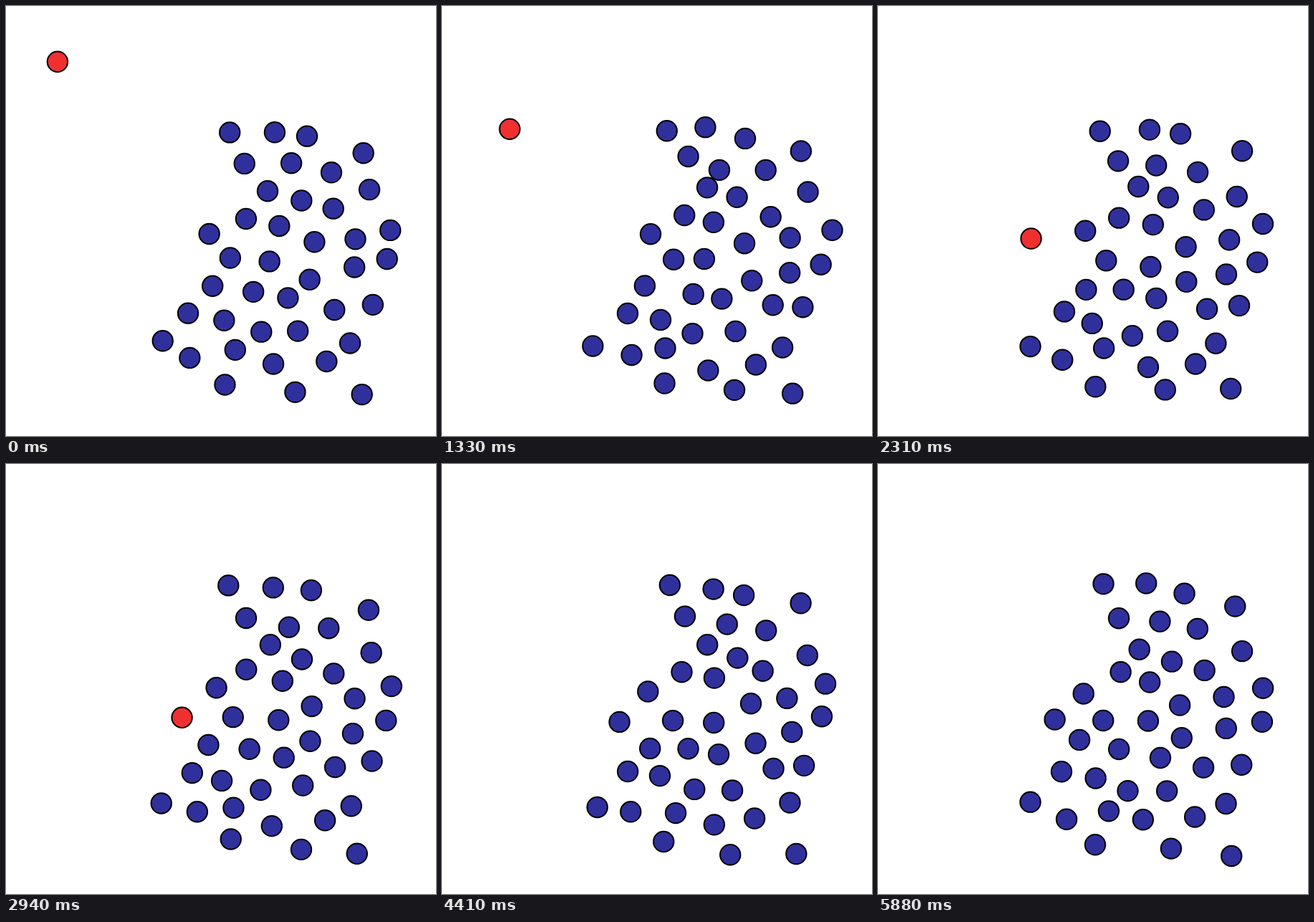
An HTML page with a canvas for the animation above (5950 ms loop, 600 by 600 pixels).

```html
<!DOCTYPE html>
<html lang="en">
<head>
<meta charset="utf-8">
<title>Particles</title>
<style>
  html, body { margin: 0; width: 100%; height: 100%; overflow: hidden; background: #fff; }
  canvas { display: block; width: 600px; height: 600px; }
</style>
</head>
<body>
<canvas id="stage" width="600" height="600"></canvas>
<script>
const ctx = document.getElementById('stage').getContext('2d');
const STEP = 70, LOOP = 5950;
const BLUE = '#30309c', RED = '#f03030';
const JOIN_TIME = 3360; // the newcomer takes the colour of the group

// Rest positions of the group: x, y pairs.
const rest = [
  314,170, 374,172, 421,182, 500,199, 340,215, 393,224, 450,232, 364,255,
  411,272, 508,263, 455,288, 539,308, 334,291, 383,303, 287,318, 428,335,
  486,325, 534,358, 317,354, 374,358, 286,391, 343,401, 389,410, 431,384,
  486,372, 506,417, 459,423, 258,430, 302,438, 215,473, 262,490, 320,481,
  355,456, 409,454, 479,473, 377,503, 440,498, 309,530, 406,542, 492,541
];

// Route of the newcomer: time, x, y.
const route = [
  [0, 67, 78], [840, 67, 78], [1260, 81, 154], [1330, 88, 173],
  [1890, 169, 272], [2310, 216, 324], [2940, 246, 352], [3220, 246, 360]
];

// Repeatable random value in 0..1 for an integer key.
function rand(key) {
  let n = Math.imul(key + 1, 0x9e3779b1);
  n = Math.imul(n ^ n >>> 16, 0x85ebca6b);
  n = Math.imul(n ^ n >>> 13, 0xc2b2ae35);
  return ((n ^ n >>> 16) >>> 0) / 4294967296;
}

function shake(ball, step, axis) {
  const key = ((step * 64 + ball) * 2 + axis) * 2;
  return rand(key) + rand(key + 1) - 1;
}

function along(t) {
  const i = route.findIndex(p => p[0] > t);
  if (i < 0) return route[route.length - 1].slice(1);
  const [t0, x0, y0] = route[i - 1], [t1, x1, y1] = route[i];
  const k = (t - t0) / (t1 - t0);
  return [x0 + (x1 - x0) * k, y0 + (y1 - y0) * k];
}

function drawBall(id, step, x, y, color) {
  ctx.beginPath();
  ctx.arc(x + 9 * shake(id, step, 0), y + 8 * shake(id, step, 1), 14.2, 0, Math.PI * 2);
  ctx.fillStyle = color;
  ctx.fill();
  ctx.stroke();
}

function draw(time) {
  const step = Math.floor(time % LOOP / STEP), t = step * STEP;
  ctx.fillStyle = '#fff';
  ctx.fillRect(0, 0, 600, 600);
  ctx.lineWidth = 2;
  ctx.strokeStyle = '#000';
  for (let i = 0; i < rest.length; i += 2) {
    drawBall(i / 2, step, rest[i], rest[i + 1], BLUE);
  }
  const [x, y] = along(t);
  drawBall(rest.length / 2, step, x, y, t < JOIN_TIME ? RED : BLUE);
}

function tick() {
  draw(performance.now());
  requestAnimationFrame(tick);
}
tick();
</script>
</body>
</html>
```
